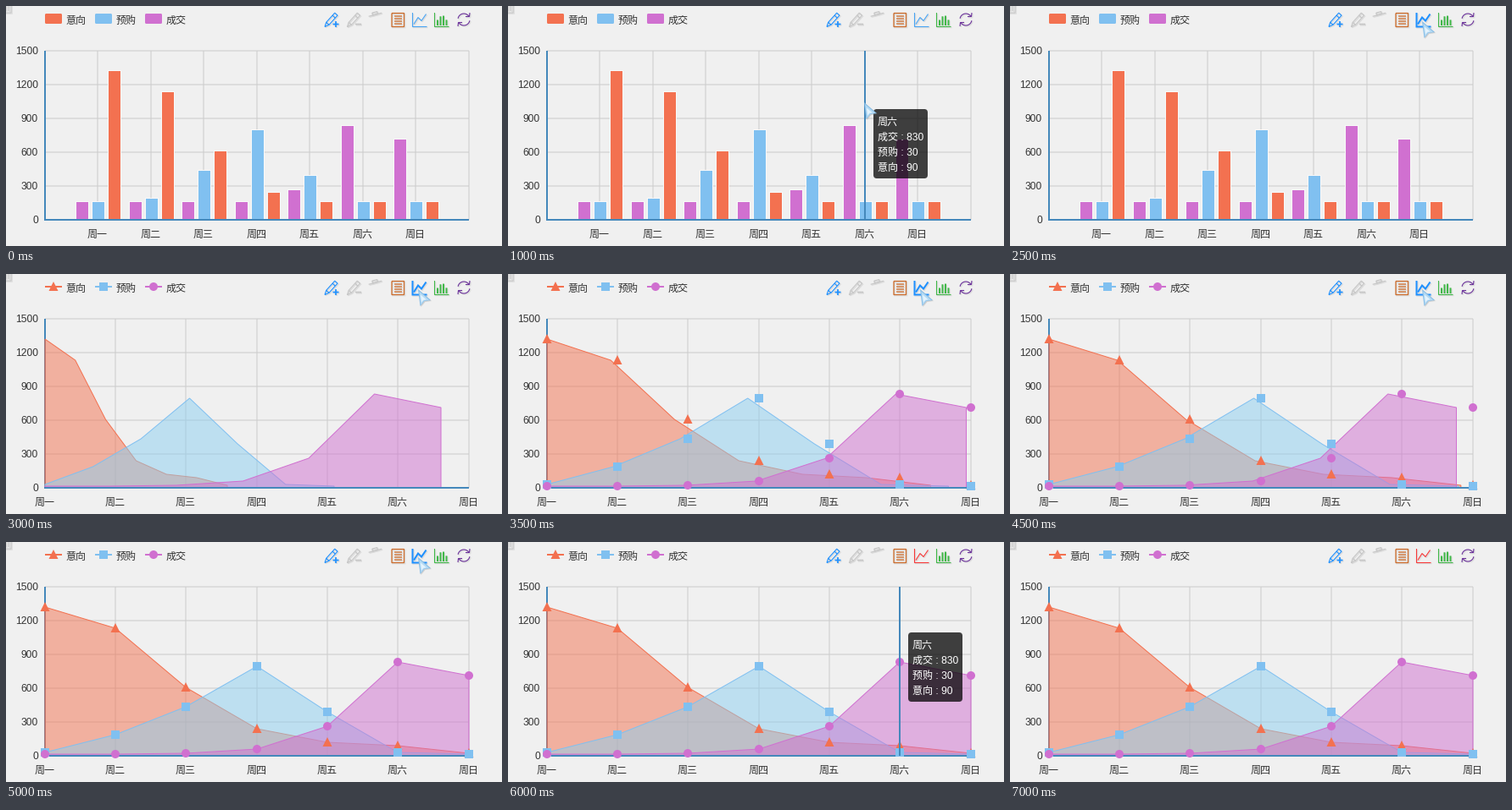
A matplotlib script for the animation above (9500 ms loop, 585x284 px).

```python
import math

import matplotlib.pyplot as plt
import numpy as np
from matplotlib.animation import FuncAnimation
from matplotlib.patches import Circle, FancyBboxPatch, Polygon, Rectangle

W, H, DPI = 585, 284, 64
PX = 72 / DPI  # points per pixel
LEFT, RIGHT, TOP, BASE = 46, 546, 53, 253
FRAMES, STEP = 19, 500
# Steps at which the scene changes
HOVER_BARS, HOVER_ICON, TO_LINES, REGROW, FULL, HOVER_LINES, REST = 2, 5, 6, 8, 10, 12, 14

BG, GRID, AXIS, INK, FADED = "#f0f0f0", "#cccccc", "#4488bb", "#333333", "#c6c6c6"
BLUE, GREEN, BROWN, INDIGO, RED = "#1e90ff", "#40b848", "#cc6c2c", "#6a309a", "#f83838"
DAYS = ["周" + c for c in "一二三四五六日"]
NAMES = ["意向", "预购", "成交"]
COLORS = ["#f37150", "#80c0f0", "#d070d0"]
FILLS = ["#f37250", "#8ccff0", "#d070d0"]
DATA = [
    [1320, 1132, 601, 234, 120, 90, 20],
    [30, 182, 434, 791, 390, 30, 10],
    [10, 12, 21, 54, 260, 830, 710],
]
# Pointer stops: first step, then tip position
STOPS = [(1, 498, 114), (2, 420, 114), (3, 469, 39), (HOVER_ICON, 486, 18), (11, 486, 126)]

plt.rcParams["font.family"] = ["Liberation Sans", "Noto Sans CJK JP"]
fig = plt.figure(figsize=(W / DPI, H / DPI), dpi=DPI, facecolor=BG)
ax = fig.add_axes([0, 0, 1, 1])


def y_of(value):
    return math.floor(BASE - value / 1500 * (BASE - TOP))


def stroke(pts, color, lw=1.0, z=2):
    xs, ys = zip(*pts)
    ax.plot(xs, ys, color=color, lw=lw * PX, zorder=z, snap=False,
            solid_capstyle="butt", solid_joinstyle="miter")


def shape(pts, color, z, **kw):
    ax.add_patch(Polygon(pts, fc=color, lw=0, zorder=z, **kw))


def rect(x0, y0, x1, y1, color, z=3):
    ax.add_patch(Rectangle((x0, y0), x1 - x0, y1 - y0, fc=color, lw=0, zorder=z))


def rounded(x, y, w, h, r, color, z, alpha=1):
    ax.add_patch(FancyBboxPatch((x, y), w, h, boxstyle=f"round,pad=0,rounding_size={r}",
                                fc=color, ec="none", alpha=alpha, zorder=z))


def text(x, baseline, s, color=INK, ha="left", z=6):
    ax.text(x, baseline, s, color=color, ha=ha, va="baseline", fontsize=12 * PX, zorder=z)


def marker(kind, x, y):
    color, r = COLORS[kind], 5
    if kind == 0:
        shape([(x, y - r - 1), (x + r + 0.5, y + r), (x - r - 0.5, y + r)], color, 6)
    elif kind == 1:
        rect(x - r, y - r, x + r, y + r, color, 6)
    else:
        ax.add_patch(Circle((x, y), r, fc=color, lw=0, zorder=6))


# --- toolbar -------------------------------------------------------------

def icon(paths, color, lw=1.1):
    for pts in paths:
        stroke([(x + 1, y + 1) for x, y in pts], "#dcdcdc", lw + 0.4, 6)
    for pts in paths:
        stroke(pts, color, lw, 7)


def box(x0, y0, x1, y1):
    return [(x0, y0), (x1, y0), (x1, y1), (x0, y1), (x0, y0)]


def row(x, y, length):
    return [(x, y), (x + length, y)]


def turned(pts, x, y, degrees):
    a = math.radians(degrees)
    return [(x + p * math.cos(a) - q * math.sin(a), y + p * math.sin(a) + q * math.cos(a))
            for p, q in pts]


def pencil(x, color):
    r = 2.2
    body = [(0, 0), (5, -r), (20, -r), (20, r), (5, r), (0, 0)]
    paths = [body] + [[(a, -r), (a, r)] for a in (5, 16)]
    icon([turned(p, x, 24.5, -48) for p in paths], color)


def bin_icon(x):
    lid = [row(-8, -6, 16), box(-3, -9, 3, -6)]
    can = [box(-6, -4, 6, 8)] + [[(a, -2), (a, 6)] for a in (-3, 0, 3)]
    icon([turned(p, x, 16, -15) for p in lid] + can, FADED)


def reload_icon(x, y, r):
    a = np.radians(np.linspace(190, 325, 20))
    arc = list(zip(r * np.cos(a), r * np.sin(a)))
    head = [(r, -r - 1), (r - 0.5, -r / 2), (r - 5, -r / 2)]
    icon([turned(p, x, y, turn) for p in (arc, head) for turn in (0, 180)], INDIGO)


def corner(x):
    return [(x, 8), (x, 24.5), (x + 17, 24.5)]


def toolbar(line_color, line_width):
    pencil(376, BLUE)
    icon([row(385.5, 21.5, 7), [(389, 18), (389, 25)]], BLUE, 1.7)
    pencil(402.5, FADED)
    icon([row(412, 21.5, 7)], FADED, 1.7)
    bin_icon(437)
    icon([box(455, 8.5, 469.5, 24.5)] + [row(458, y, 9) for y in range(12, 22, 3)], BROWN, 1.3)
    icon([corner(479.5), [(481, 21.5), (486, 13.5), (490, 17.5), (495.5, 9.5)]],
         line_color, line_width)
    icon([corner(505.5)], GREEN)
    icon([[(509 + 3.5 * i, 23), (509 + 3.5 * i, 13.5 + 3 * math.cos(2 * i))]
          for i in range(4)], GREEN, 2)
    reload_icon(540, 16, 7)


# --- charts --------------------------------------------------------------

def frame(xs):
    for x in xs:
        stroke([(x, TOP), (x, BASE)], GRID, 1, 1)
    for v in range(0, 1501, 300):
        y = y_of(v)
        if v:
            stroke([(LEFT, y), (RIGHT, y)], GRID, 1, 1)
        text(38, y + 4.2, str(v), ha="right")
    stroke([(LEFT, TOP), (LEFT, BASE + 1)], AXIS, 2)
    stroke([(LEFT - 1, BASE), (RIGHT, BASE)], AXIS, 2)
    for x, day in zip(xs, DAYS):
        text(x, 273.5, day, ha="center")


def legend(lines):
    for i, name in enumerate(NAMES):
        x = 46 + 59 * i
        if lines:
            stroke([(x, 15), (x + 20, 15)], COLORS[i], 2)
            marker(i, x + 10, 15)
        else:
            rounded(x, 9, 20, 12, 1.5, COLORS[i], 3)
        text(x + 24.7, 20.7, name)


def bar_chart():
    frame([math.floor(LEFT + 62.5 * i) for i in range(1, 9)])
    for i in range(7):
        for slot, s in enumerate((2, 1, 0)):
            x = math.floor(83.5 + 62.5 * i) + 19 * slot
            top = min(y_of(DATA[s][i]), 232)
            rect(x - 1, top - 1, x + 15, 252, "#f8f8f8")
            rect(x, top, x + 14, 252, COLORS[s])


def growth(k, s):
    """Width share of area s; the gap shrinks sixfold per step, in two runs."""
    if k >= FULL:
        return 1
    if k >= REGROW:
        return 1 - (0.17 + 0.032 * s) * 6.0 ** (REGROW - k)
    return 1 - (0.095 - 0.042 * s) * 6.0 ** (REGROW - 1 - k)


def line_chart(k):
    xs = [math.floor(LEFT + (RIGHT - LEFT) * i / 6) for i in range(7)]
    frame(xs)
    for s, values in enumerate(DATA):
        g = growth(k, s)
        pts = [(LEFT + (x - LEFT) * g, y_of(v)) for x, v in zip(xs, values)]
        outline = [(LEFT, 252)] + pts + [(pts[-1][0], 252)]
        shape(outline, FILLS[s], 3 + s * 0.1, alpha=0.5)
        stroke(outline, COLORS[s], 1, 3.05 + s * 0.1)
        if k > TO_LINES:
            for x, v in zip(xs, values):
                marker(s, x, y_of(v))


# --- pointer and tooltip -------------------------------------------------

def tooltip(x, y, day):
    stroke([(x, TOP), (x, BASE)], AXIS, 2, 8)
    rounded(x + 10, y, 64, 82, 4, "black", 9, 0.74)
    rows = [DAYS[day]] + [f"{NAMES[s]} : {DATA[s][day]}" for s in (2, 1, 0)]
    for i, line in enumerate(rows):
        text(x + 14.7, y + 18.7 + 18 * i, line, "white", z=10)


def pointer(x, y):
    arrow = np.array([(0, 0), (15, 13), (7.5, 14), (2.5, 20)])
    centre = arrow.mean(axis=0)
    shape(arrow + (x + 1, y + 1), "#888888", 11, alpha=0.3)
    shape(arrow + (x, y), "#84bce6", 12)
    shape((arrow - centre) * 0.8 + centre + (x, y), "#b4daf4", 13)
    shape((arrow - centre) * 0.45 + centre + (x - 0.5, y), "#e4f3fd", 14)


def draw(k):
    ax.cla()
    ax.set(xlim=(0, W), ylim=(H, 0))
    ax.axis("off")
    lines = k >= TO_LINES
    legend(lines)
    if lines:
        line_chart(k)
    else:
        bar_chart()

    if k < HOVER_ICON:
        toolbar("#48a4f4", 1.1)
    elif k < HOVER_LINES:
        toolbar(BLUE, 2)
    else:
        toolbar(RED, 1.1)

    if HOVER_BARS <= k < HOVER_ICON:
        tooltip(421, 122, 5)
    elif HOVER_LINES <= k < REST:
        tooltip(462, 107 - 2 * (k - HOVER_LINES), 5)
    if STOPS[0][0] <= k < HOVER_LINES:
        pointer(*[stop for stop in STOPS if stop[0] <= k][-1][1:])
    return []


anim = FuncAnimation(fig, draw, frames=FRAMES, init_func=lambda: [], interval=STEP,
                     repeat=True, repeat_delay=0, blit=False)
plt.show()
```
